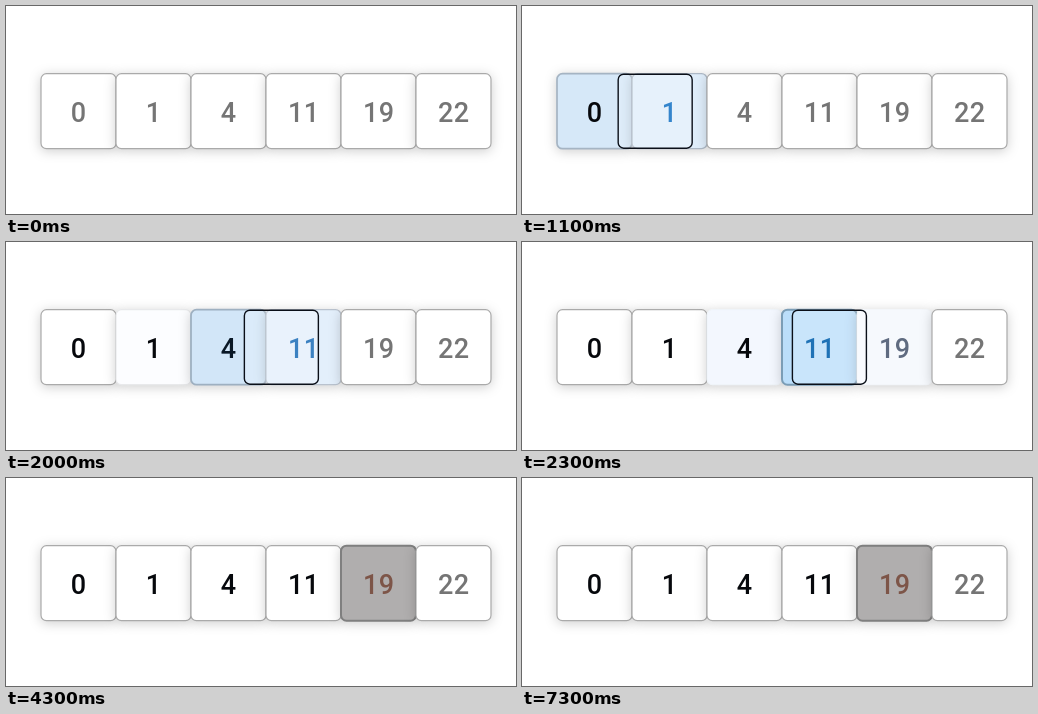
Animation of 510x208 px, one loop 8000 ms. Source, as an HTML page:

```html
<!DOCTYPE html>
<html lang="en">
<head>
<meta charset="utf-8">
<title>Linear search</title>
<style>
  html, body { margin: 0; width: 100%; height: 100%; overflow: hidden; background: #fff; }
  svg { display: block; }
  .cell { fill: #fff; stroke: #aaa; stroke-width: 1.2; filter: drop-shadow(0 2.5px 6px rgba(0, 0, 0, .19)); }
  .label {
    font: 500 27px Roboto, sans-serif;
    letter-spacing: .3px; text-anchor: middle; fill: #757575;
  }
  .cursor { fill: rgba(255, 255, 255, .2); stroke: #0a0f18; stroke-width: 1.4; opacity: 0; }
</style>
</head>
<body>
<svg width="510" height="208" viewBox="0 0 510 208"></svg>
<script>
const VALUES = [0, 1, 4, 11, 19, 22];
const FOUND = 4, PITCH = 75, LEFT = 35, TOP = 67.7, LOOP = 8000, TICK = 100;
const START = 500, FIRST = 690, STEP = 465, MOVE = 288;

// Colour and width tracks, timed relative to the cursor's arrival at a cell.
const SEEN = {
  fill: [[-300, 'ffffff'], [-250, 'f6f9fd'], [-30, 'dcebfa'], [215, 'bbdefa'],
         [430, 'd9e9f8'], [690, 'f4f8fe'], [900, 'ffffff']],
  line: [[-300, 'aaaaaa'], [-250, 'f3f6fa'], [-40, 'a9b4c2'], [215, '7b9db6'],
         [430, 'a9b6c4'], [690, 'f2f6fb'], [910, 'e4e4e4'], [1150, 'aaaaaa']],
  text: [[-300, '757575'], [-250, '5f6b80'], [-30, '2f88d6'], [215, '1f72b6'], [410, '06080c']]
};
const HIT = {
  fill: [...SEEN.fill.slice(0, 3), [250, 'c0daf1'], [550, 'b0aeae']],
  line: [...SEEN.line.slice(0, 3), [250, '7c97b0'], [550, '7f7f7f']],
  text: [...SEEN.text.slice(0, 3), [250, '4a72a8'], [550, '7d5548']]
};

const clamp = x => Math.min(1, Math.max(0, x));
const rgb = hex => [0, 2, 4].map(i => parseInt(hex.slice(i, i + 2), 16));

function colourAt(track, u) {
  let i = 0;
  while (i < track.length - 2 && u > track[i + 1][0]) i++;
  const [[t0, a], [t1, b]] = track.slice(i, i + 2);
  const k = clamp((u - t0) / (t1 - t0)), end = rgb(b);
  return `rgb(${rgb(a).map((c, j) => Math.round(c + (end[j] - c) * k))})`;
}

const svg = document.querySelector('svg');
function add(tag, attrs, text = '') {
  const el = document.createElementNS('http://www.w3.org/2000/svg', tag);
  for (const name in attrs) el.setAttribute(name, attrs[name]);
  el.textContent = text;
  return svg.appendChild(el);
}
const box = (name, x, y, size) =>
  add('rect', { class: name, x, y, width: size, height: size, rx: 5.5 });

const cells = VALUES.map((_, i) => box('cell', LEFT + PITCH * i, TOP, PITCH));
const cursor = box('cursor', LEFT + .5, TOP + .5, PITCH - 1);
const labels = VALUES.map((v, i) =>
  add('text', { class: 'label', x: LEFT + PITCH * (i + .5) + .2, y: 115.5 }, v));

function render(t) {
  for (let i = 0; i <= FOUND; i++) {
    const u = t < START ? -300 : t - FIRST - STEP * i;
    const track = i === FOUND ? HIT : SEEN;
    const lit = clamp((u + 100) / 300) * (i === FOUND ? 1 : clamp((600 - u) / 300));
    cells[i].style.fill = colourAt(track.fill, u);
    cells[i].style.stroke = colourAt(track.line, u);
    cells[i].style.strokeWidth = 1.2 + .8 * lit;
    labels[i].style.fill = colourAt(track.text, u);
  }
  let pos = 0;
  for (let i = 1; i <= FOUND; i++) pos += clamp((t - FIRST - STEP * i) / MOVE + 1);
  cursor.style.transform = `translateX(${PITCH * pos}px)`;
  cursor.style.opacity = Math.min(clamp((t - 400) / 200) * (t >= START), clamp((2750 - t) / 150));
}

const origin = performance.now();
function frame() {
  const t = (performance.now() - origin) % LOOP;
  render(Math.floor(t / TICK) * TICK);
  requestAnimationFrame(frame);
}
render(0);
requestAnimationFrame(frame);
</script>
</body>
</html>
```
